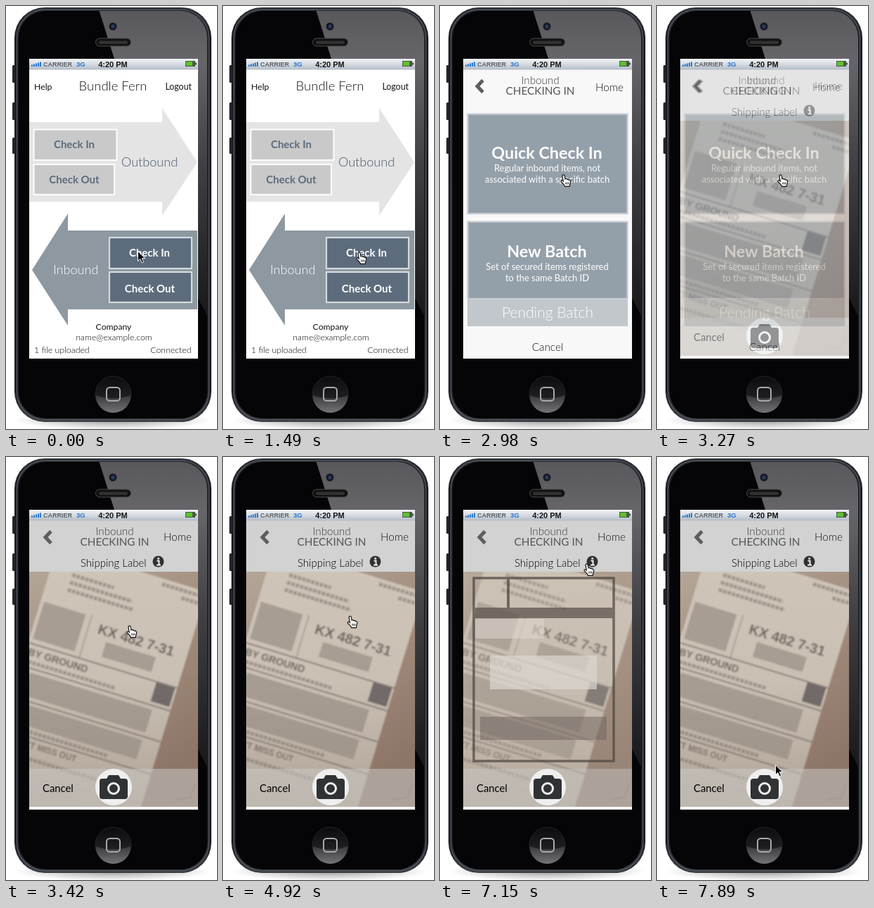
An HTML page that plays this animation: 300 by 601 pixels, repeating every 8 s.

```html
<!DOCTYPE html>
<html lang="en">
<head>
<meta charset="utf-8">
<title>Parcel check-in</title>
<style>
  html, body { margin: 0; width: 100%; height: 100%; overflow: hidden; background: #fff; }
  svg { display: block; width: 100vw; height: 100vh; }
  text { font-family: Lato, "Open Sans", sans-serif; white-space: pre; }
  .ui { font-family: "Liberation Sans", Arial, sans-serif; font-weight: 700; }
  .light { font-weight: 300; }
  .bold { font-weight: 700; }
  .mid { text-anchor: middle; }
  .end { text-anchor: end; }
</style>
</head>
<body>
<svg viewBox="0 0 300 601" xmlns="http://www.w3.org/2000/svg">
  <defs>
    <linearGradient id="rim" x2="0" y2="1">
      <stop stop-color="#2b2e34"/><stop offset=".08" stop-color="#1b1d22"/>
      <stop offset=".92" stop-color="#1d1f24"/><stop offset="1" stop-color="#3b3e44"/>
    </linearGradient>
    <linearGradient id="shine" x2="0" y2="1">
      <stop stop-color="#58585c"/><stop offset=".16" stop-color="#66666a"/>
      <stop offset=".5" stop-color="#404044"/><stop offset="1" stop-color="#17171a"/>
    </linearGradient>
    <linearGradient id="status" x2="0" y2="1">
      <stop stop-color="#f1f4f6"/><stop offset=".5" stop-color="#d6dbe1"/><stop offset="1" stop-color="#b3bcc6"/>
    </linearGradient>
    <linearGradient id="button" x2="0" y2="1">
      <stop stop-color="#0c0c0e"/><stop offset="1" stop-color="#2c2c2f"/>
    </linearGradient>
    <linearGradient id="gloss" x2="0" y2="1">
      <stop stop-color="#38383b"/><stop offset="1" stop-color="#747477"/>
    </linearGradient>
    <linearGradient id="table" x2=".4" y2="1">
      <stop stop-color="#b3a597"/><stop offset=".5" stop-color="#a28c7c"/><stop offset="1" stop-color="#8d7668"/>
    </linearGradient>
    <linearGradient id="paper" x2=".2" y2="1">
      <stop stop-color="#cfc5b8"/><stop offset=".5" stop-color="#cac0b4"/><stop offset="1" stop-color="#b0a396"/>
    </linearGradient>
    <radialGradient id="shadow">
      <stop stop-color="#777" stop-opacity=".7"/><stop offset="1" stop-color="#777" stop-opacity="0"/>
    </radialGradient>
    <filter id="soft"><feGaussianBlur stdDeviation="1.1"/></filter>
    <clipPath id="glass"><rect x="18" y="7" width="268" height="579" rx="38"/></clipPath>
    <clipPath id="display"><rect x="33" y="75" width="240" height="426"/></clipPath>
    <clipPath id="view"><rect x="33" y="163" width="240" height="334"/></clipPath>
  </defs>

  <rect width="300" height="601" fill="#fff"/>
  <ellipse cx="152" cy="589" rx="140" ry="13" fill="url(#shadow)"/>
  <g fill="#25272c">
    <rect x="9" y="84" width="6" height="25" rx="1.5"/>
    <rect x="9" y="137" width="6" height="25" rx="1.5"/>
    <rect x="9" y="187" width="6" height="23" rx="1.5"/>
  </g>
  <rect x="12" y="2" width="280" height="589" rx="43" fill="url(#rim)"/>
  <rect x="15.500" y="5" width="273" height="583" rx="40" fill="none" stroke="#50545b" stroke-width="1.4"/>
  <rect x="18" y="7" width="268" height="579" rx="38" fill="#050508"/>
  <path d="M132 5H290V448L273 415L154 75Z" fill="url(#shine)" clip-path="url(#glass)"/>
  <circle cx="152" cy="29" r="5.500" fill="#17191e"/>
  <circle cx="152" cy="29" r="2.600" fill="#263d70"/>
  <rect x="127.500" y="46" width="50" height="11" rx="5.500" fill="#111" stroke="#4b4b4b"/>
  <rect x="132" y="49.500" width="41" height="4.500" rx="2.200" fill="#313131"/>
  <circle cx="152.500" cy="551.500" r="25.500" fill="url(#button)" stroke="#242424"/>
  <path d="M127.500 553Q152.500 562 177.500 553A25 25 0 0 1 127.500 553Z" fill="url(#gloss)"/>
  <rect x="143" y="542" width="19" height="19" rx="4.500" fill="none" stroke="#a9a9a9" stroke-width="2"/>

  <g clip-path="url(#display)">
    <rect x="33" y="75" width="240" height="426" fill="#fff"/>
    <g id="home"></g>
    <g id="menu"></g>
    <g id="scan">
      <g clip-path="url(#view)">
        <rect x="33" y="163" width="240" height="338" fill="url(#table)"/>
        <g id="label" transform="translate(62 163) rotate(17)" filter="url(#soft)"></g>
        <path d="M269 464L262 484L241 487" fill="none" stroke="#6e6057" stroke-width="3" opacity=".5"/>
      </g>
      <g id="guide"></g>
      <g id="controls"></g>
    </g>
    <rect x="33" y="75" width="240" height="15.500" fill="url(#status)"/>
    <g id="signal"></g>
    <text class="ui" x="53" y="86" font-size="9" fill="#5c6268">CARRIER</text>
    <text class="ui" x="100" y="86" font-size="9.600" fill="#2b78d0">3G</text>
    <text class="ui mid" x="152" y="86.500" font-size="11" fill="#161616">4:20 PM</text>
    <rect x="255" y="78" width="14" height="8" fill="#4a5648"/>
    <rect x="256" y="79" width="9" height="6" fill="#5cc22c"/>
    <rect x="269" y="80.500" width="2" height="3" fill="#4a5648"/>
  </g>

  <g id="cursor">
    <path id="arrow" d="M.5 .5V14.500L3.800 11.400L6.200 16.800L8.600 15.700L6.200 10.500H10.700Z" fill="#000" stroke="#fff"/>
    <g id="hand">
      <path d="M3 2.400C3.200 .4 5.900 .4 6.200 2.400L7 6.800C8 5.800 9.500 6.300 9.800 7.400C11 6.600 12.100 7.300 12.300 8.400C13.600 7.800 14.900 8.800 14.700 10.600L13.800 14.200L13.200 17.300H6.600L5 14.500L1.200 10.600C.4 9 2 8.200 3.300 9.300L4.200 10Z" fill="#fff" stroke="#111" stroke-width="1.200"/>
      <path d="M7.800 11.500V14.500M9.800 11.500V14.500M11.700 11.500V14.500" stroke="#111" stroke-width=".9"/>
    </g>
  </g>
</svg>

<script>
const LOOP = 8000, TICK = 148.9;
const $ = id => document.getElementById(id);

const text = (s, x, y, size, fill, cls = '') =>
  `<text class="${cls}" x="${x}" y="${y}" font-size="${size}" fill="${fill}">${s}</text>`;
const rect = (x, y, w, h, fill, extra = '') =>
  `<rect x="${x}" y="${y}" width="${w}" height="${h}" fill="${fill}" ${extra}/>`;
const path = (d, extra) => `<path d="${d}" ${extra}/>`;
const edge = (color, width = 2.2) => `stroke="${color}" stroke-width="${width}"`;

const header = (x, backX, homeX, homeY) =>
  path(`M${backX + 8} 105.500L${backX} 114L${backX + 8} 122.500`, 'fill="none" stroke="#5c5e60" stroke-width="5"') +
  text('Inbound', x, 111, 15.2, '#3c3e40', 'light mid') +
  text('CHECKING IN', x, 126, 15.3, '#54575a', 'mid') +
  text('Home', homeX, homeY, 15.2, '#111', 'light');

$('signal').innerHTML = [0, 1, 2, 3, 4].map(i =>
  rect(36 + i * 3, 83.5 - i, 2, 2.5 + i, '#2b78d0')).join('');

$('home').innerHTML =
  text('Help', 40, 119, 12.3, '#111') +
  text('Bundle Fern', 152, 120, 18.5, '#111', 'light mid') +
  text('Logout', 264, 119, 12.4, '#111', 'end') +
  path('M33 165H222V145L272 222L222 298V278H33Z', 'fill="#e4e4e4"') +
  rect(39.5, 175.5, 118, 43.5, '#c9c9c9', edge('#fafafa')) +
  rect(39.5, 225, 114.5, 43, '#c9c9c9', edge('#fafafa')) +
  text('Check In', 97, 202, 15, '#5c6c7b', 'bold mid') +
  text('Check Out', 97, 252, 15, '#5c6c7b', 'bold mid') +
  text('Outbound', 164, 228, 18.1, '#44566a', 'light') +
  path('M37 375L88 295V319H272V431H88V454Z', 'fill="#8d98a0"') +
  rect(147, 329, 117, 44, '#5c6c7d', edge('#d5dade')) +
  rect(147, 378, 117, 43, '#5c6c7d', edge('#d5dade')) +
  text('Check In', 204, 356, 15, '#fff', 'bold mid') +
  text('Check Out', 204.5, 407, 15, '#fff', 'bold mid') +
  text('Inbound', 67, 381, 18.1, '#fff', 'light') +
  text('Company', 153, 460, 12.2, '#111', 'mid') +
  text('name@example.com', 153.5, 475, 12.3, '#000', 'light mid') +
  text('1 file uploaded', 40, 493, 12.3, '#000', 'light') +
  text('Connected', 263.5, 493, 12.3, '#000', 'light end');

$('menu').innerHTML =
  rect(33, 90, 240, 411, '#f8f8f8') +
  header(142.5, 53, 221, 121) +
  rect(39.5, 153.5, 227, 141.5, '#94a0a9', edge('#c9ced6')) +
  text('Quick Check In', 152, 217, 23.3, '#fff', 'bold mid') +
  text('Regular inbound items, not', 152.5, 235, 12.9, '#fff', 'mid') +
  text('associated with a specific batch', 152.5, 250.5, 12.9, '#fff', 'mid') +
  rect(39.5, 306.5, 227, 109.5, '#94a0a9', edge('#c9ced6')) +
  text('New Batch', 152, 357, 23.3, '#fff', 'bold mid') +
  text('Set of secured items registered', 152.5, 374.5, 12.9, '#fff', 'mid') +
  text('to the same Batch ID', 152.5, 390.5, 12.9, '#fff', 'mid') +
  rect(39, 417, 228, 38, '#c1c7cb') +
  text('Pending Batch', 153, 443, 21, '#fff', 'light mid') +
  text('Cancel', 153, 490, 15.3, '#111', 'light mid');

// Label coordinates run along the tilted paper.
const ink = '#7d736b';
const print = (x, y, w) => path(`M${x} ${y}h${w}`, `stroke="${ink}" stroke-width="5" stroke-dasharray="5 1.500" opacity=".6"`);
const rule = (y, x = 0, w = 222 - x) => rect(x, y, w, 2, '#6e655e', 'opacity=".75"');
const block = (x, y, w, h) => rect(x, y, w, h, '#8f857c', 'opacity=".6"');

$('label').innerHTML =
  rect(0, -38, 222, 390, 'url(#paper)') +
  print(32, -5, 62) + print(32, 6, 92) + print(32, 17, 98) +
  print(158, -30, 58) + print(190, -19, 26) +
  rect(75, 41, 1.5, 64, '#857a71', 'opacity=".6"') +
  block(5, 43, 62, 55) +
  text('KX 482 7-31', 90, 64, 20, '#6a615a', 'ui') +
  block(106, 72, 74, 22) +
  rule(104) + text('BY GROUND', 4, 122, 14.5, '#6a615a', 'ui') +
  rect(191, 106, 28, 28, '#716b67') +
  print(8, 131, 130) + rule(138) +
  block(15, 145, 182, 34) + rule(184) +
  block(20, 190, 176, 29) + print(26, 226, 130) + rule(232) +
  text("DON'T MISS OUT", 16, 248, 12, '#7a7068', 'ui') +
  print(50, 263, 100);

$('guide').innerHTML =
  rect(33, 163, 240, 280, '#c7b9ab', 'opacity=".28"') +
  rect(48, 172, 199, 260, 'none', edge('#58504a', 3.5)) +
  rect(95, 173, 4, 41, '#58504a') +
  rect(48, 214, 199, 15, '#645b54') +
  rect(50, 230, 98, 28, '#dcd5cd', 'opacity=".75"') +
  rect(71, 282, 152, 48, '#dcd6cf', 'opacity=".92"') +
  rect(57, 369, 180, 33, '#776c64', 'opacity=".7"');

$('controls').innerHTML =
  rect(33, 90, 240, 73, '#d1d2d1') +
  header(154.5, 56, 224, 119) +
  text('Shipping Label', 106, 156, 15, '#000', 'light') +
  '<circle cx="216.500" cy="148.500" r="8" fill="#303030"/>' +
  path('M214.500 147.500h3v5.500M214 153.500h6', 'fill="none" stroke="#eee" stroke-width="2"') +
  rect(215.3, 143, 2.8, 2.5, '#eee') +
  rect(33, 443, 240, 54, '#c9c7c3', 'opacity=".55"') +
  rect(33, 497, 240, 4, '#fafafa') +
  text('Cancel', 52, 476, 14.8, '#000') +
  '<circle cx="153" cy="469" r="26" fill="#efefef"/>' +
  path('M137 457H143L146 452H160L163 457H169Q173 457 173 461V482Q173 486 169 486H137Q133 486 133 482V461Q133 457 137 457Z', 'fill="#303234"') +
  '<circle cx="153" cy="471" r="7.500" fill="none" stroke="#efefef" stroke-width="3"/>';

// Cursor stops: tick, x, y
const stops = [
  [0, 187, 348], [6, 187, 348], [7, 183, 348], [8, 189, 349], [17, 189, 349], [20, 171, 239],
  [32, 171, 239], [36, 204, 151], [49, 204, 151], [53, 168, 437], [54, 168, 437]
];
const ramp = (k, from, to) => Math.min(1, Math.max(0, (k - from) / (to - from)));

function cursorAt(k) {
  const i = Math.max(1, stops.findIndex(s => s[0] >= k));
  const [a, b] = [stops[i - 1], stops[i]];
  const p = ramp(k, a[0], b[0]), e = p * p * (3 - 2 * p);
  return [1, 2].map(n => a[n] + (b[n] - a[n]) * e);
}

function draw(ms) {
  const k = Math.min(53, Math.floor((ms + 8) / TICK));
  $('menu').setAttribute('opacity', ramp(k, 10, 12));
  $('scan').setAttribute('opacity', ramp(k, 21, 23));
  $('guide').setAttribute('opacity', ramp(k, 37, 41) * (1 - ramp(k, 47, 52)));
  const pointing = k >= 7 && k < 51;
  $('hand').setAttribute('visibility', pointing ? 'visible' : 'hidden');
  $('arrow').setAttribute('visibility', pointing ? 'hidden' : 'visible');
  $('cursor').setAttribute('transform', `translate(${cursorAt(k)})`);
}

const start = performance.now();
function loop() {
  draw((performance.now() - start) % LOOP);
  requestAnimationFrame(loop);
}
draw(0);
requestAnimationFrame(loop);
</script>
</body>
</html>
```
